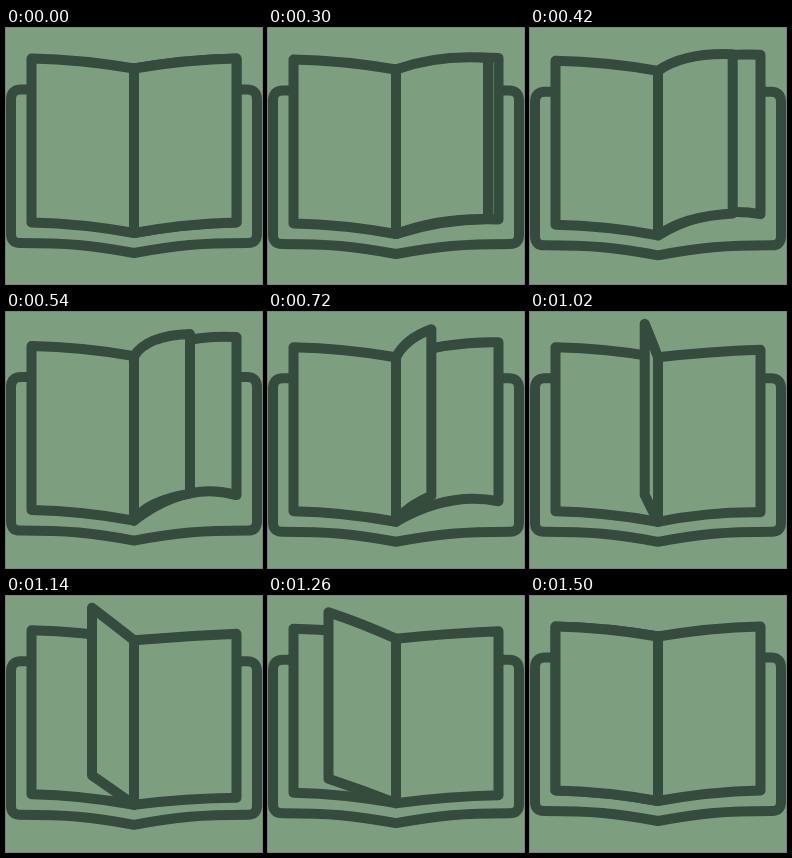
An HTML page with a canvas that plays this animation: 256 by 256 pixels, repeating every 1680 ms.

```html
<!DOCTYPE html>
<html lang="en">
<head>
<meta charset="utf-8">
<title>Turning page</title>
<style>
  html, body { margin: 0; width: 100%; height: 100%; overflow: hidden; background: #7d9f80; }
  canvas { display: block; width: 256px; height: 256px; }
</style>
</head>
<body>
<canvas id="stage" width="256" height="256"></canvas>
<script>
const ctx = document.getElementById('stage').getContext('2d');
const PAPER = '#7d9f80', INK = '#354b3e';
const LOOP = 1680, HOLD = 180, STEP = 60, LAST = 23;
const SPINE = { x: 128, top: 40.5, bottom: 205 };

// A page: outer edge x, top, bottom, then the bend x, top, bottom.
const LEFT = [25.5, 30.5, 194.5, 76, 31.5, 195.5];
const RIGHT = [230.5, 30.5, 194.5, 180, 31.5, 195.5];

// Poses over the turn: step, downward shift, turning page, page beneath.
const poses = [
  { at: 0,  drop: 0,   turn: RIGHT,                          under: RIGHT },
  { at: 3,  drop: 1,   turn: [220, 29, 190, 170, 25.5, 189], under: [230.5, 29, 190.5, 180, 26.5, 188.5] },
  { at: 7,  drop: 3.6, turn: [184, 18.5, 178, 141, 20, 185], under: [230.5, 21.5, 179.5, 180, 18.5, 165] },
  { at: 13, drop: 5.3, turn: [140, 8, 181, 134, 24.5, 195],  under: [230.5, 31, 192, 180, 32, 189] },
  { at: 17, drop: 3.8, turn: [86, 8, 175.5, 107, 24, 190],   under: [230.5, 34, 198, 180, 36, 198.5] },
  { at: 19, drop: 2.2, turn: [60.5, 14, 180.5, 95, 25.5, 192], under: [230.5, 33, 197, 180, 35, 198] },
  { at: 23, drop: 0,   turn: LEFT,                           under: RIGHT }
];

// Smooth curve through the poses, at rest at both ends.
function sample(step, read) {
  let i = 0;
  while (i < poses.length - 2 && step > poses[i + 1].at) i++;
  const a = poses[i], b = poses[i + 1], span = b.at - a.at;
  const slope = n => {
    const p = poses[n - 1], q = poses[n + 1];
    return p && q ? (read(q) - read(p)) / (q.at - p.at) : 0;
  };
  const u = (step - a.at) / span, v = 1 - u;
  return read(a) * v * v * (1 + 2 * u) + read(b) * u * u * (1 + 2 * v)
    + span * u * v * (slope(i) * v - slope(i + 1) * u);
}

const samplePage = (step, name) => LEFT.map((_, i) => sample(step, pose => pose[name][i]));

function drawPage([x, top, bottom, bendX, bendTop, bendBottom]) {
  ctx.beginPath();
  ctx.moveTo(SPINE.x, SPINE.top);
  ctx.quadraticCurveTo(bendX, bendTop, x, top);
  ctx.lineTo(x, bottom);
  ctx.quadraticCurveTo(bendX, bendBottom, SPINE.x, SPINE.bottom);
  ctx.closePath();
  ctx.fill();
  ctx.stroke();
}

function drawCover() {
  ctx.beginPath();
  ctx.moveTo(22, 61.5);
  ctx.lineTo(15, 61.5);
  ctx.quadraticCurveTo(5, 61.5, 5, 71.5);
  ctx.lineTo(5, 206);
  ctx.quadraticCurveTo(5, 215, 14, 215);
  ctx.bezierCurveTo(62, 215, 84, 217, 128, 225);
  ctx.bezierCurveTo(172, 217, 194, 215, 242, 215);
  ctx.quadraticCurveTo(251, 215, 251, 206);
  ctx.lineTo(251, 71.5);
  ctx.quadraticCurveTo(251, 61.5, 241, 61.5);
  ctx.lineTo(234, 61.5);
  ctx.stroke();
}

function draw(time) {
  const moved = Math.floor((time % LOOP - HOLD) / STEP) + 1;
  const step = Math.min(LAST, Math.max(0, moved));

  ctx.setTransform(1, 0, 0, 1, 0, 0);
  ctx.fillStyle = PAPER;
  ctx.fillRect(0, 0, 256, 256);
  ctx.strokeStyle = INK;
  ctx.lineWidth = 10;
  ctx.lineJoin = ctx.lineCap = 'round';
  ctx.translate(0, sample(step, pose => pose.drop));

  drawCover();
  drawPage(LEFT);
  drawPage(samplePage(step, 'under'));
  drawPage(samplePage(step, 'turn'));
}

let start;
function tick(now) {
  start ??= now;
  draw(Math.max(0, now - start));
  requestAnimationFrame(tick);
}
draw(0);
requestAnimationFrame(tick);
</script>
</body>
</html>
```
